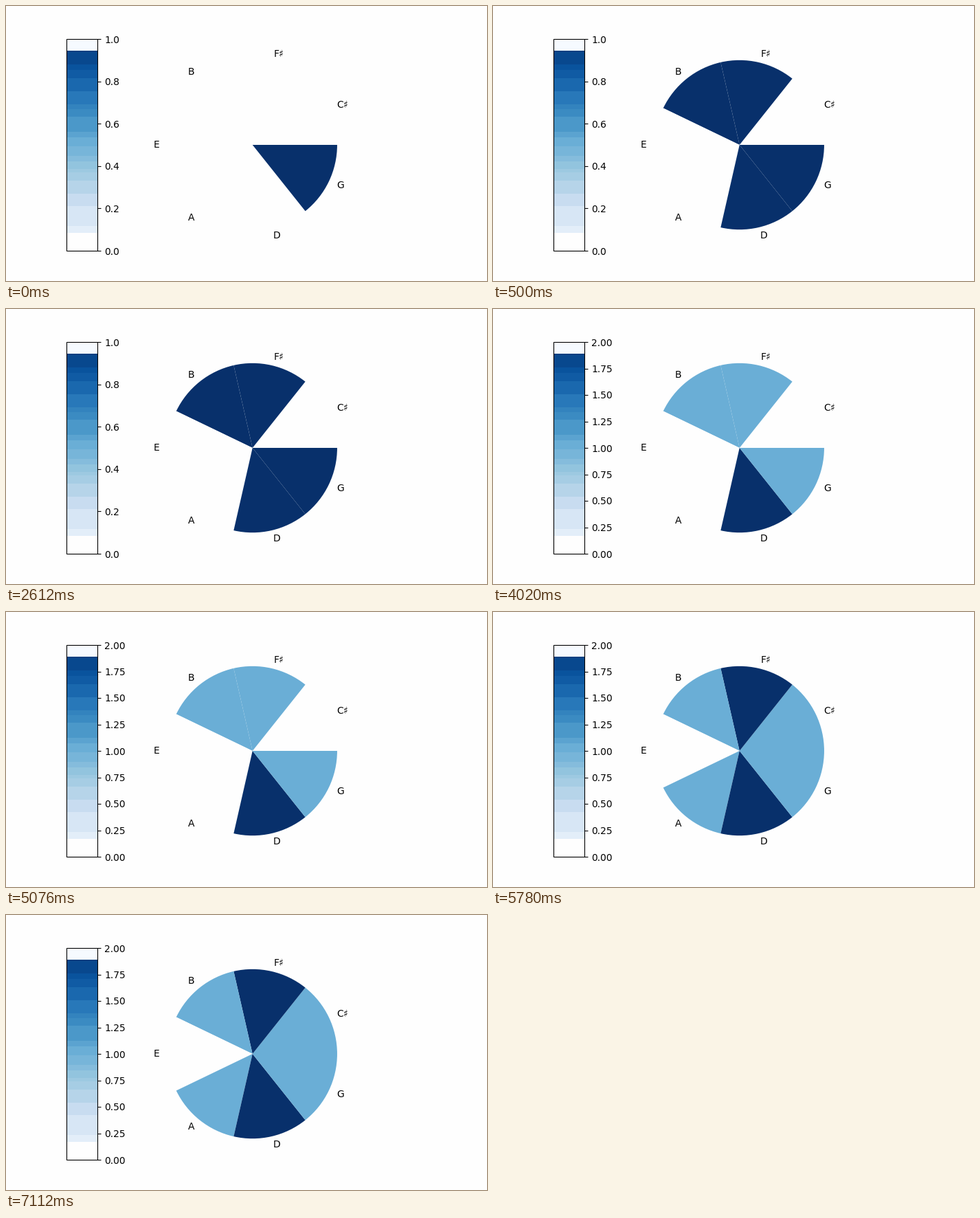
Write a matplotlib script that moves like this. It is 700 by 400 pixels and loops after 8000 ms.

```python
import numpy as np
import matplotlib.pyplot as plt
from matplotlib.animation import FuncAnimation
from matplotlib.cm import ScalarMappable
from matplotlib.colors import ListedColormap, Normalize, to_rgb

plt.rcParams["font.family"] = "DejaVu Sans"

STEP = 20      # ms per frame
LOOP = 8000    # ms per loop
PAPER = "#fefefe"
NOTES = ["C♯", "F♯", "B", "E", "A", "D", "G"]

# time in ms -> notes that sound then
HITS = {0: "G", 500: "F♯ B D", 4020: "D", 5780: "C♯ F♯ A"}

blues = plt.get_cmap("Blues")


def tone(level):
    return to_rgb(PAPER) if level == 0 else blues(level)[:3]


def banded_blues(size=256):
    """Blues in flat bands: colours sharing 3-4-3 bits of RGB become one."""
    levels = np.linspace(0, 1, size)
    colors = blues(levels)[:, :3]
    cells = np.floor(colors * 255 / [32, 16, 32])
    _, band = np.unique(cells, axis=0, return_inverse=True)
    band = band.ravel()
    for b in np.unique(band):
        colors[band == b] = colors[band == b].mean(axis=0)
    # bands that hold a wedge colour take it over
    for level in (0, 0.5, 1):
        same = band == band[round(level * (size - 1))]
        colors[same] = tone(level)
    return ListedColormap(colors)


def count_hits(now):
    played = " ".join(n for start, n in HITS.items() if start <= now).split()
    return [played.count(note) for note in NOTES]


fig = plt.figure(figsize=(7, 4), dpi=100, facecolor=PAPER)

pie_ax = fig.add_axes([0.125, 0.11, 0.775, 0.77])
labels = [note.replace("♯", r"$\sharp$") for note in NOTES]
wedges, _ = pie_ax.pie(np.ones(len(NOTES)), labels=labels)

bar_ax = fig.add_axes([0.125, 0.11, 0.775 / 11.8, 0.77])
scale = ScalarMappable(Normalize(0, 1), banded_blues())
fig.colorbar(scale, cax=bar_ax)


def update(frame):
    counts = count_hits(frame * STEP)
    peak = max(counts)
    for wedge, count in zip(wedges, counts):
        wedge.set_facecolor(tone(count / peak))
    scale.set_clim(0, peak)
    return wedges


anim = FuncAnimation(fig, update, frames=LOOP // STEP,
                     init_func=lambda: update(0), interval=STEP,
                     repeat=True, repeat_delay=0, blit=False)
plt.show()
```
